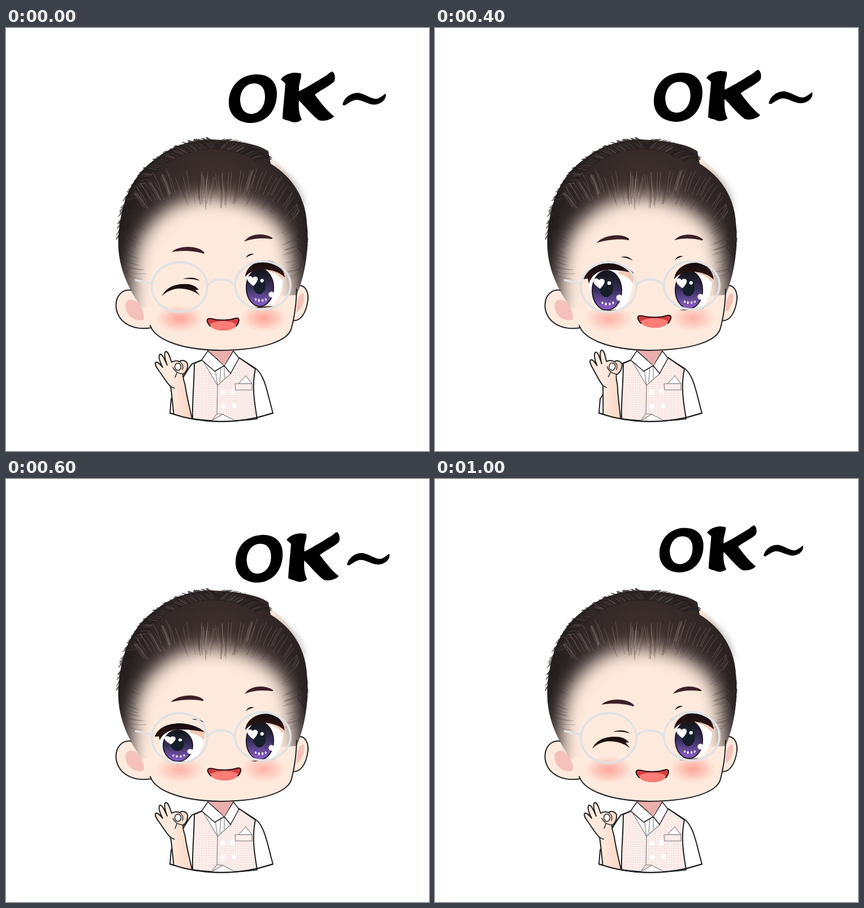
These frames come from a looping animation (748 px wide and 748 px high, 1.2 s). An HTML page:

```html
<!DOCTYPE html>
<html lang="en">
<head>
<meta charset="utf-8">
<title>OK~</title>
<style>
html, body { margin: 0; width: 100%; height: 100%; overflow: hidden; background: #fff; }
svg { display: block; width: 100%; height: 100%; }
.ink { stroke: #222; stroke-width: 2; stroke-linejoin: round; stroke-linecap: round; }
.thin { stroke: #777; stroke-width: 1.1; stroke-linejoin: round; }
.line { fill: none; }
.skin { fill: #feeadd; }
.pink { fill: #f5c1bb; }
.brow { fill: #3d2027; }
.lash { fill: url(#lashInk); }
.hair { fill: none; stroke-linecap: round; }
</style>
</head>
<body>
<svg viewBox="0 0 748 748">
<defs>
  <radialGradient id="hairFill" gradientUnits="userSpaceOnUse" cx="372" cy="290" r="190">
    <stop offset="0" stop-color="#43332f"/><stop offset=".45" stop-color="#352a29"/><stop offset="1" stop-color="#221c1d"/>
  </radialGradient>
  <radialGradient id="blush">
    <stop offset="0" stop-color="#ff8d80" stop-opacity=".75"/><stop offset=".5" stop-color="#ff9d90" stop-opacity=".45"/>
    <stop offset="1" stop-color="#ffb0a0" stop-opacity="0"/>
  </radialGradient>
  <linearGradient id="irisFill" x2="0" y2="1">
    <stop offset=".1" stop-color="#17181f"/><stop offset=".5" stop-color="#38305a"/><stop offset=".9" stop-color="#8058ba"/>
  </linearGradient>
  <linearGradient id="lashInk" x2="0" y2="1">
    <stop offset="0" stop-color="#140b0d"/><stop offset="1" stop-color="#351a18"/>
  </linearGradient>
  <linearGradient id="armFill" x2="1" y2="0">
    <stop offset=".4" stop-color="#feeadd"/><stop offset="1" stop-color="#fbd3c0"/>
  </linearGradient>
  <pattern id="dots" width="4" height="4" patternUnits="userSpaceOnUse">
    <rect width="4" height="4" fill="#fcefec"/><circle cx="2" cy="2" r=".9" fill="#f2d6d4"/>
  </pattern>
  <filter id="soft" x="-20%" y="-20%" width="140%" height="140%"><feGaussianBlur stdDeviation="16"/></filter>
  <filter id="haze" x="-50%" y="-50%" width="200%" height="200%"><feGaussianBlur stdDeviation="5"/></filter>
  <mask id="fade" maskUnits="userSpaceOnUse" x="150" y="150" width="440" height="450">
    <rect x="150" y="150" width="440" height="450" fill="#fff"/>
    <path filter="url(#soft)" d="M215 620L222 470C222 430 226 395 238 372C258 336 295 303 350 299C410 296 462 318 490 355C506 385 511 430 512 470L530 620Z"/>
  </mask>
  <clipPath id="bust"><path d="M250 540H500V681H472Q380 711 290 681H250Z"/></clipPath>
  <g id="iris">
    <ellipse rx="26" ry="35" fill="url(#irisFill)" stroke="#1c1622" stroke-width="2"/>
    <ellipse cx="-1" cy="-4" rx="12" ry="16" fill="#161f29"/>
    <path fill="#fff" d="M-12 -3C-20 -8 -26 -14 -23 -19C-20 -23 -15 -21 -14 -18C-11 -22 -5 -21 -4 -17C-4 -12 -8 -7 -12 -3Z"/>
    <g fill="#fff"><circle cx="4" cy="-13" r="3.3"/><circle cx="22" cy="13" r="5.5"/>
      <ellipse cx="-8" cy="22" rx="1.5" ry="2.3"/><ellipse cx="-2" cy="24" rx="1.7" ry="2.6"/>
      <ellipse cx="5" cy="24" rx="1.7" ry="2.6"/><ellipse cx="11" cy="22" rx="1.5" ry="2.3"/></g>
  </g>
</defs>

<g id="body">
  <path class="pink" fill-opacity=".9" d="M357 560H401L404 576L386 600L356 576Z" style="fill:#e9b0ab"/>
  <path class="ink" fill="#fff" d="M347 587L329 594C312 615 303 640 292 656L290 681Q380 711 472 681C463 650 458 612 440 601L412 583Z"/>
  <path class="ink" fill="url(#dots)" stroke-width="1.5" d="M347 587L333 593C333 625 329 660 330 691Q387 699 444 691C440 665 434 635 441 603L412 583L386 618Z"/>
  <path class="thin" fill="#fff" d="M348 588L374 632L412 584L386 598Z"/>
  <path class="thin" fill="#fff" d="M370 603L378 596L385 599L392 595L398 611L385 622L374 632Z"/>
  <path class="thin line" d="M380 597L378 626M386 598V619M374 632L373 682L364 694M373 682L383 683"/>
  <path class="thin" fill="#fff" d="M363 695L383 683L406 695Z"/>
  <path class="ink" fill="#fff" d="M357 571L346 587L369 607L386 597ZM402 571L412 584L397 611L386 597Z" style="stroke-width:1.5"/>
  <path d="M358 569H402L386 597Z" fill="#e9b0ab"/>
  <g fill="#fff"><circle cx="383" cy="644" r="4.5"/><circle cx="400" cy="643" r="4.5"/><circle cx="384" cy="669" r="4.5"/><circle cx="403" cy="668" r="4.5"/></g>
  <path class="thin" fill="#fff" d="M411 629L424 615L435 629Z"/>
  <path class="thin" fill="#fcefec" d="M405 629H435V640H406Z"/>
  <g clip-path="url(#bust)"><g id="arm">
    <path class="ink" fill="url(#armFill)" d="M300 710C295 675 294 650 291 634C283 626 277 615 271 607C266 600 262 594 265 591C269 590 273 595 277 600C272 590 269 580 272 577C276 575 281 587 285 596C280 583 279 573 283 572C288 573 290 584 293 591C297 588 303 588 307 590C311 586 319 588 321 594C322 602 318 610 313 612C312 620 316 626 317 633C320 655 326 675 333 710Z"/>
    <ellipse class="ink" fill="#fff" cx="304" cy="599" rx="5.5" ry="6.5" style="stroke-width:1.5"/>
    <path class="ink line" d="M313 612C304 611 298 607 295 600M307 590C312 593 314 598 312 604M302 610L299 618M291 634L298 637" style="stroke-width:1.4"/>
  </g></g>
  <path class="ink line" d="M290 681Q380 711 472 681"/>
</g>

<g id="head">
  <path class="ink skin" d="M228 465C205 458 192 475 195 497C200 522 226 537 262 529L250 480Z"/>
  <path class="pink" d="M212 486C218 475 235 482 240 495C244 505 245 513 243 516C226 521 208 505 212 486Z"/>
  <path class="ink skin" d="M512 457C528 451 535 465 534 480C531 505 520 520 506 517Z"/>
  <path class="pink" d="M514 498C514 478 521 467 526 470C530 478 525 497 513 503Z"/>
  <path class="skin" d="M236 488C205 440 196 405 199 365C205 260 290 197 365 197C465 197 533 265 533 370C533 420 521 455 514 470C513 500 508 515 505 530C500 552 460 569 380 570C300 569 265 547 258 530Z"/>
  <path class="ink line" d="M255 526C262 547 300 569 380 570C460 569 500 552 505 530C508 518 513 500 514 462"/>
  <path d="M468 238C505 255 530 285 530 320L515 310Z" fill="#999" opacity=".45" filter="url(#haze)"/>
  <g mask="url(#fade)">
    <path fill="url(#hairFill)" d="M240 495C205 445 196 405 199 365C204 310 220 265 258 237C290 208 330 197 365 197C405 199 445 204 464 218L468 240C505 262 530 300 532 345C537 390 528 440 514 472Z"/>
  </g>
  <g id="strands"></g>
  <ellipse cx="307" cy="514" rx="44" ry="25" fill="url(#blush)" class="blush"/>
  <ellipse cx="456" cy="513" rx="42" ry="25" fill="url(#blush)" class="blush"/>
</g>

<path id="browL" class="brow" d="M293 396C306 384 338 384 350 396Q352 399 349 399C335 394 312 393 293 396Z"/>
<path id="browR" class="brow" d="M421 378C430 364 455 361 471 371Q472 373 469 373C452 371 435 372 421 378Z"/>

<g id="wink" class="lash">
  <path d="M276 474C283 457 303 451 322 453C332 454 338 459 341 463L335 463L343 473C330 463 315 460 302 461C290 463 283 467 276 474Z"/>
  <path d="M313 444C325 440 335 441 343 447C334 444 325 443 313 444Z"/>
</g>
<g id="eyeL">
  <path fill="#fff" d="M272 450C278 433 290 424 305 424C325 424 342 430 350 440C350 465 342 490 328 497L288 497C276 482 272 465 272 450Z"/>
  <path fill="#f3c9b4" d="M325 426L351 434L350 452C344 442 336 437 325 435Z"/>
  <use href="#iris" x="304" y="464"/>
  <path class="lash" d="M263 444C268 425 285 414 308 414C328 415 343 424 352 434C335 429 318 427 302 428C286 430 277 438 272 452L270 443Z"/>
  <path class="lash" d="M328 405C338 403 345 405 350 412C345 408 338 406 328 405ZM288 498Q306 503 328 498Q306 500 288 498Z"/>
</g>
<g id="eyeR">
  <path fill="#fff" d="M425 440C435 427 470 422 490 438C491 460 486 480 472 494H434C426 480 424 460 425 440Z"/>
  <path fill="#f3c9b4" d="M462 425L492 437L489 450C482 440 474 436 462 434Z"/>
  <use href="#iris" transform="translate(449 463) scale(.93 .95)"/>
  <path class="lash" d="M423 444C424 428 440 414 464 415C480 417 491 428 493 445C484 436 470 431 454 431C440 431 430 436 423 444Z"/>
  <path class="lash" d="M424 411C427 404 433 402 439 404C433 405 428 407 424 411ZM432 499Q450 496 476 496Q452 500 432 499Z"/>
</g>

<g id="mouth">
  <path id="lips" fill="#d33f42" d="M355 517Q356 512 363 514C378 518 395 517 407 513Q413 512 412 518C408 530 398 535 384 535C368 535 357 526 355 517Z"/>
  <path fill="#fb7d76" d="M359 525C368 517 398 515 408 525C402 532 394 535 384 535C372 535 363 531 359 525Z"/>
  <path class="ink line" d="M361 527C354 520 353 512 363 514C378 518 395 517 407 513C414 512 413 520 407 527" style="stroke:#2c1215"/>
</g>

<g fill="none" stroke="#dfe2e4" stroke-width="3.8" stroke-linecap="round">
  <ellipse cx="307" cy="458" rx="49" ry="44"/><ellipse cx="454" cy="455" rx="49" ry="42.500"/>
  <path d="M357 455C365 441 395 441 404 455M230 446L257 452"/>
</g>

<g id="word" role="img" aria-label="OK~">
  <path fill-rule="evenodd" d="M441 82C467 81 480 97 479 118C478 147 460 168 432 168C408 167 393 152 394 130C395 102 415 83 441 82ZM439 98C424 98 414 111 414 128C415 143 422 152 434 152C449 151 458 138 458 121C458 107 451 98 439 98Z"/>
  <path d="M486 91C491 84 499 80 511 79L521 80C524 83 520 92 518 104L518 112C536 103 556 90 568 83C571 80 575 77 577 77C582 80 583 90 580 95C570 104 556 110 546 118C555 130 567 146 580 156C576 162 562 166 553 163C540 153 528 138 518 128C517 140 518 152 523 162C518 167 508 168 503 165C498 163 493 163 489 160C490 140 493 115 494 98Z"/>
  <path d="M595 136C598 122 612 113 625 115C638 118 648 127 657 125C664 122 668 118 671 116C674 122 668 132 656 135C643 138 630 126 618 127C610 129 604 134 599 137Z"/>
</g>
</svg>
<script>
const $ = id => document.getElementById(id);
const move = (id, t) => $(id).setAttribute('transform', t);
const show = (id, on) => $(id).setAttribute('visibility', on ? 'visible' : 'hidden');

let seed = 7;
const rnd = () => (seed = seed * 16807 % 2147483647) / 2147483647;

// A point on the skull ellipse: angle a, r = 1 on the rim
const rim = (a, r) =>
  (366 + 167 * r * Math.cos(a)).toFixed(1) + ' ' + (370 + 173 * r * Math.sin(a)).toFixed(1);
const hairline = a => .42 + .45 * Math.cos(a) ** 2 + .3 * Math.max(0, Math.sin(a));

function strands(count, from, to, color, width, opacity, shape) {
  let d = '';
  for (let i = 0; i < count; i++) {
    const a = from + (to - from) * rnd();
    d += shape(a, a < 4.75 ? -1 : 1, rnd());
  }
  $('strands').insertAdjacentHTML('beforeend',
    `<path class="hair" d="${d}" stroke="${color}" stroke-width="${width}" opacity="${opacity}"/>`);
}
const edge = (a, lean, k) =>
  `M${rim(a - lean * .06, .9)}Q${rim(a, .985)} ${rim(a + lean * .08, 1 + .025 * k)}`;
const fringe = (a, lean, k) => {
  const e = hairline(a);
  return `M${rim(a - lean * .06, Math.min(.97, e + .3))}Q${rim(a, e + .1)} ${rim(a + lean * .1, e - .02 - .12 * k)}`;
};
const sheen = (a, lean, k) => {
  const e = hairline(a) + .12 * k;
  return `M${rim(a - lean * .03, Math.min(.95, e + .16))}Q${rim(a, e + .05)} ${rim(a + lean * .07, e - .04)}`;
};
strands(150, 3.2, 5.3, '#241d1e', 1.3, .8, edge);
strands(60, 5.6, 6.5, '#2b2425', 1, .5, (a, l, k) => edge(a, l, k * .4));
strands(60, 3.6, 5.2, '#77706e', .8, .4, (a, l, k) => `M${rim(a, .91)}L${rim(a + l * .06, .96 + .03 * k)}`);
strands(110, 2.7, 6.7, '#3a2c2b', 1, .3, fringe);
strands(70, 3.6, 6.1, '#cdbab3', .8, .35, sheen);

// word: x, y, scale; wink: shift of the closed lid; open: height of the left eye
const poses = [
  { word: [393, 77, 1], arm: 0, wink: '0 0', eyeR: -4, mouth: [0, 0, 1] },
  { word: [398, 86, .957], arm: 6, wink: '0 0', eyeR: -3, mouth: [0, 0, 1.05] },
  { word: [386, 74, 1.01], arm: 6, open: 1, eyeR: 0, mouth: [3, -5, 1.04], blush: .8,
    browL: 'translate(-8 -20) rotate(-8 322 392)', browR: 'translate(3 0) rotate(6 446 370)' },
  { word: [405, 94, .98], arm: 0, open: .79, eyeR: 0, mouth: [1, -2, 1.04], blush: .8,
    browL: 'translate(-2 -4) rotate(-5 322 392)', browR: 'translate(1 2)' },
  { word: [402, 87, .905], arm: 6, open: .52, eyeR: -2, mouth: [0, 1, 1.02],
    browL: 'translate(1 3)', browR: 'translate(0 2)' },
  { word: [396, 82, .915], arm: 0, wink: '2 3', eyeR: -2, mouth: [0, 1, 1.02],
    browL: 'translate(1 3)', browR: 'translate(0 2)' }
];

function draw(p) {
  const [x, y, s] = p.word, [mx, my, ms] = p.mouth;
  move('word', `translate(${x} ${y}) scale(${s}) translate(-393 -77)`);
  move('arm', `rotate(${p.arm} 312 688)`);
  move('mouth', `translate(${354 + mx} ${my}) scale(${ms} 1) translate(-354 0)`);
  move('browL', p.browL || '');
  move('browR', p.browR || '');
  move('eyeR', `translate(0 ${p.eyeR})`);
  show('wink', p.wink);
  show('eyeL', p.open);
  if (p.wink) move('wink', `translate(${p.wink})`);
  if (p.open) move('eyeL', `translate(0 500) scale(1 ${p.open}) translate(0 -500)`);
  document.querySelectorAll('.blush').forEach(b => b.setAttribute('opacity', p.blush || 1));
}

let start, last = -1;
function tick(now) {
  start ??= now;
  const i = Math.floor((now - start) % 1200 / 200);
  if (i !== last) draw(poses[last = i]);
  requestAnimationFrame(tick);
}
draw(poses[0]);
requestAnimationFrame(tick);
</script>
</body>
</html>
```
